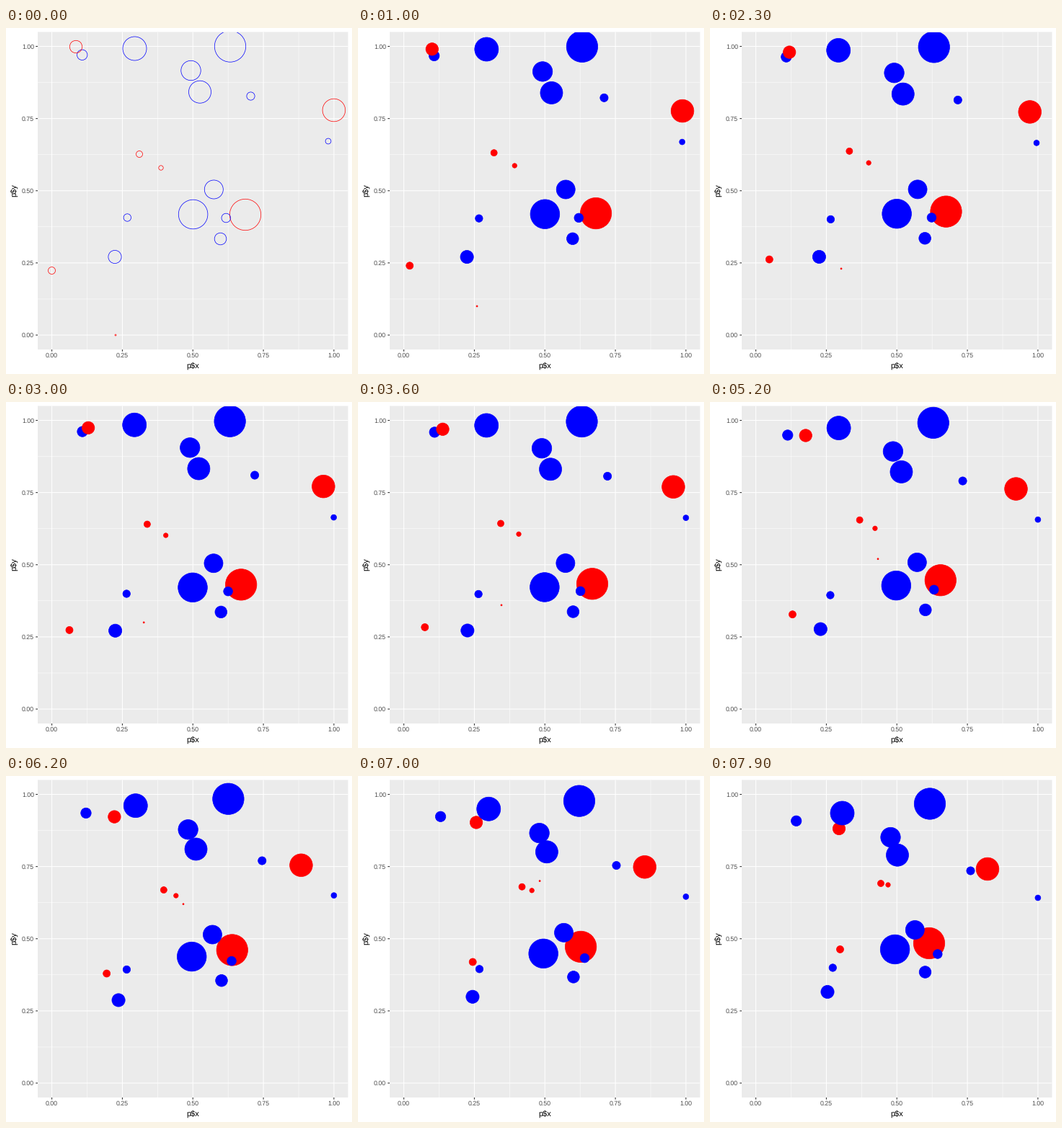
Write a matplotlib script that moves like this. It is 480x480 px and loops after 8000 ms.

```python
import matplotlib.pyplot as plt
import numpy as np
from matplotlib.animation import FuncAnimation
from matplotlib.patches import Circle, Rectangle

SIZE, DPI = 480, 72          # at 72 dpi one point is one pixel
FRAMES, INTERVAL = 80, 100
LEFT, TOP, RIGHT, BOTTOM = 44, 5.5, 474.5, 446
X0, Y0, SX, SY = 63.6, 426, 391.3, 400.5

SWITCH, RATE = 47, 3.3       # the bodies move faster after SWITCH
DRAG = 0.08                  # slows the red bodies
PULL = 0.1                   # draws the blue bodies towards CENTRE
CENTRE = np.array([260, 110])

# radius, start x and y, total travel in x and y
REDS = [
    (8.7, 97, 26, 82, 47),
    (15.8, 455, 114, -70, 15),
    (4.5, 185, 175, 52, -26),
    (3.2, 215, 194, 32, -43),
    (21.7, 332, 259, -28, -27),
    (5, 63.5, 336.5, 117, -96),
]
BLUES = [
    (7.2, 105.7, 37.3, 14, 25),
    (16.5, 178.5, 28.5, 5, 23),
    (21.7, 311, 25.5, -6, 13),
    (13.7, 256.5, 59, -6, 26),
    (15.5, 269, 88.7, -9, 21),
    (5.6, 339.5, 94.5, 22, 37),
    (3.9, 447, 157, 24, 12),
    (13, 288.3, 224, -4, -10.5),
    (20.3, 259.6, 258.5, -3, -18),
    (6.3, 305.3, 263.5, 10.5, -16.5),
    (5.2, 168.3, 263, 2, 3),
    (8.3, 297.5, 292.5, 1, -20.5),
    (9.1, 151, 317.5, 12, -18),
]


def sim_time(frame):
    return frame + (RATE - 1) * max(0, frame - SWITCH)


def red_path(start, travel, w):
    return start + travel * w * (1 + DRAG * (1 - w))


def blue_path(start, travel, w):
    return start + travel * w - PULL * (CENTRE - start) * w * (1 - w)


plt.rcParams["font.family"] = "Liberation Sans"
plt.rcParams["text.hinting"] = "none"
fig = plt.figure(figsize=(SIZE / DPI, SIZE / DPI), dpi=DPI, facecolor="white")
ax = fig.add_axes([0, 0, 1, 1])
ax.set(xlim=(0, SIZE), ylim=(SIZE, 0))
ax.axis("off")

panel = Rectangle((LEFT, TOP), RIGHT - LEFT, BOTTOM - TOP, snap=False,
                  facecolor="#EBEBEB", edgecolor="none", zorder=0)
ax.add_patch(panel)


def line(xs, ys, color, width):
    ax.plot(xs, ys, color=color, lw=width, zorder=1, snap=False,
            solid_capstyle="butt")


def grid(values, width):
    for v in values:
        x, y = X0 + SX * v, Y0 - SY * v
        line((LEFT, RIGHT), (y, y), "white", width)
        line((x, x), (TOP, BOTTOM), "white", width)


ticks = np.linspace(0, 1, 5)
grid(ticks[:-1] + 0.125, 0.53)
grid(ticks, 1.07)

label = dict(fontsize=8.8, color="#4D4D4D", va="baseline")
for v in ticks:
    x, y = X0 + SX * v, Y0 - SY * v
    line((LEFT - 2.75, LEFT), (y, y), "#333333", 1.07)
    line((x, x), (BOTTOM, BOTTOM + 2.75), "#333333", 1.07)
    ax.text(LEFT - 4.9, y + 3.2, f"{v:.2f}", ha="right", **label)
    ax.text(x, 457.3, f"{v:.2f}", ha="center", **label)

title = dict(fontsize=11, ha="center", va="baseline", parse_math=False)
ax.text((LEFT + RIGHT) / 2, 471.3, "p$x", **title)
ax.text(14, (TOP + BOTTOM) / 2 - 0.5, "p$y", rotation=90,
        rotation_mode="anchor", **title)


def bubble(radius, color, zorder):
    dot = Circle((0, 0), radius, edgecolor=color, facecolor="none",
                 lw=0.71, zorder=zorder)
    ax.add_patch(dot)
    dot.set_clip_path(panel)
    return dot


bodies = []
for color, path, rows in (("red", red_path, REDS), ("blue", blue_path, BLUES)):
    for i, (r, *state) in enumerate(rows):
        z = 3 if color == "red" else (4 if i else 2)
        start, travel = np.reshape(state, (2, 2))
        bodies.append((bubble(r, color, z), path, start, travel))
speck = bubble(1, "red", 3)
dots = [body[0] for body in bodies] + [speck]


def update(frame):
    w = sim_time(frame) / sim_time(FRAMES - 1)
    for dot, path, start, travel in bodies:
        x, y = path(start, travel, w)
        dot.center = min(x, X0 + SX), y
    # the lightest body always climbs 0.01 per step
    speck.center = (np.interp(frame, (0, 36, 52, 62, 79),
                              (152, 199, 233, 246, 259)),
                    Y0 - SY * 0.01 * frame)
    for dot in dots:
        dot.set_facecolor(dot.get_edgecolor() if frame else "none")
    return dots


anim = FuncAnimation(fig, update, frames=FRAMES, interval=INTERVAL,
                     repeat=True, repeat_delay=0, blit=False)
plt.show()
```
